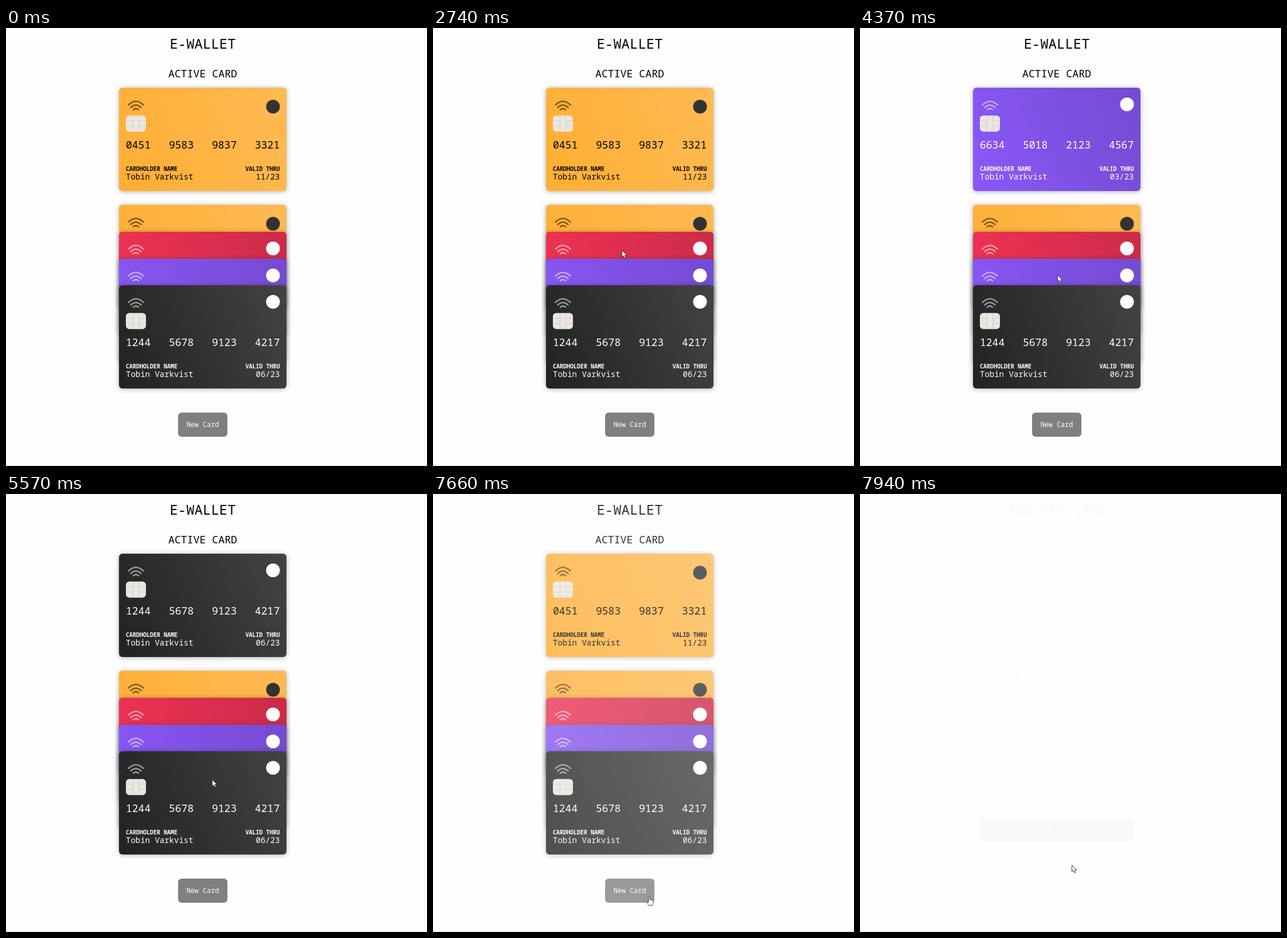
Animation of 734 by 763 pixels, one loop 7990 ms. Source, as an HTML page:

```html
<!DOCTYPE html>
<html lang="en">
<head>
<meta charset="utf-8">
<title>E-Wallet</title>
<style>
  html, body { margin: 0; width: 100%; height: 100%; overflow: hidden; background: #fefefe; }
  body { position: relative; }
  svg, .page, .card { position: absolute; left: 0; top: 0; }
  svg { width: 734px; height: 763px; overflow: visible; }
  .card svg { width: 292px; height: 180px; }
  .card { left: 197px; width: 292px; height: 180px; border-radius: 6px; box-shadow: 0 1px 8px rgba(25, 35, 45, .36); }
  text { font-family: "Noto Sans Mono", "DejaVu Sans Mono", monospace; font-weight: 500; white-space: pre; }
  #rule { position: absolute; left: 0; right: 0; top: 762px; height: 1px; background: #ddd; }
</style>
</head>
<body>
<div class="page" id="wallet"></div>
<div class="page" id="form"></div>
<div id="rule"></div>
<svg id="cursor">
  <g stroke="#2b2b2b" stroke-width=".9" fill="#fff" stroke-linejoin="round">
    <path id="arrow" d="M.5.5V12L3.1 9.6 5 14 7 13.1 5.2 8.9H8.8Z"/>
    <path id="hand" d="M-1.2.4Q0-1.4 1.2.4V5Q2.5 4.2 3.4 5.4 4.6 4.8 5.3 6 6.9 5.6 7 7.4V10.6L5.4 14.6H-.8L-4.6 9.4Q-4.8 7.6-3 8.2L-1.2 9.8Z"/>
  </g>
</svg>
<script>
const LOOP = 7990;
const $ = id => document.getElementById(id);
const light = "rgba(255,255,255,.15)", dark = "rgba(0,0,0,.16)";

const cards = [
  { base: "#ffae34", tint: light, ink: "#000", mark: "#333", markY: 33, number: "0451 9583 9837 3321", valid: "11/23" },
  { base: "#f33355", tint: dark, number: "7812 2222 3412 9456", valid: "05/23" },
  { base: "#8b58f9", tint: dark, number: "6634 5018 2123 4567", valid: "03/23" },
  { base: "#222", tint: light, number: "1244 5678 9123 4217", valid: "06/23" }
];

// [time, index of the active card]
const picks = [[0, 0], [3020, 1], [4290, 2], [5440, 3], [6410, 0]];

// [start, end, control x, control y, end x, end y]
const moves = [
  [190, 450, 560, 640, 458, 577],
  [650, 1440, 239, 400, 340, 260],
  [1470, 1750, 339, 220, 365, 207],
  [1750, 2230, 435, 210, 350, 270],
  [2280, 2740, 345, 330, 329, 387],
  [3400, 3630, 334, 412, 344, 430],
  [4520, 4930, 378, 462, 359, 497],
  [5720, 6180, 352, 415, 345, 332],
  [6540, 7200, 350, 520, 383, 689],
  [7250, 7380, 382, 698, 377, 702],
  [7680, 7935, 376, 670, 369, 646]
];

const text = (x, y, size, str, fill = "#000", anchor = "start", weight = 500) =>
  `<text x="${x}" y="${y}" font-size="${size}" fill="${fill}" text-anchor="${anchor}" style="font-weight:${weight}">${str}</text>`;

const rect = (x, y, w, h, attrs) => `<rect x="${x}" y="${y}" width="${w}" height="${h}" ${attrs}/>`;

function card({ base, tint, ink = "#fff", mark = "#fff", markY = 29, number, valid }, y) {
  const digits = number.split(" ").map((s, i) => text(12 + i * 75, 105.5, 18, s, ink)).join("");
  return `<div class="card" style="top:${y}px;background:linear-gradient(248.5deg,${tint},transparent),${base}"><svg>
    <path d="M16.5 30Q29.5 17.5 42.5 30M20.5 34.5Q29.5 26 38.5 34.5M25 38.2Q29.5 34.6 34 38.2"
      fill="none" stroke="${ink}" stroke-opacity=".52" stroke-width="2.5" stroke-linecap="round"/>
    ${rect(12, 48.5, 35, 28, 'rx="6" fill="#eae7e0"')}
    <path d="M24.5 48.5V76.5M35 48.5V76.5M12 57.5H24.5M12 67H24.5M35 57.5H47M35 67H47" stroke="#d0cdc6" fill="none"/>
    <circle cx="268.5" cy="${markY}" r="12" fill="${mark}"/>
    ${digits}
    ${text(12, 145, 10, "CARDHOLDER NAME", ink, "start", 600)}
    ${text(12, 160, 14, "Tobin Varkvist", ink)}
    ${text(280.5, 145, 10, "VALID THRU", ink, "end", 600)}
    ${text(280.5, 160, 14, valid, ink, "end")}
  </svg></div>`;
}

$("wallet").innerHTML = `<svg>
    ${text(343, 35.5, 24, "E-WALLET", "#000", "middle")}
    ${text(343, 86, 18.2, "ACTIVE CARD", "#000", "middle")}
    ${rect(300, 670, 86, 42, 'rx="6" fill="#808080"')}
    ${text(343, 695, 11.8, "New Card", "#fff", "middle", 400)}
  </svg>`
  + cards.map(c => card(c, 104)).join("")
  + cards.map((c, i) => card(c, 308 + i * 46.75)).join("");
const active = [...document.querySelectorAll(".card")].slice(0, cards.length);

const label = (x, y, str) => text(x, y, 11.7, str);
const field = (x, y, w) => rect(x, y, w, 26, 'rx="4" fill="#fff" stroke="#000"');
$("form").innerHTML = `<svg>
    <path d="M214 18L206 26.5 214 35" fill="none" stroke="#000" stroke-width="2"/>
    ${text(343.5, 35.5, 24, "ADD NEW CARD", "#000", "middle", 700)}
    ${label(209, 258, "CARD NUMBER")}${field(210, 273.5, 267)}
    ${label(209, 321, "CARDHOLDER NAME")}${field(210, 336.5, 267)}
    ${label(209, 383, "MONTH")}${field(210, 397.5, 127)}
    ${label(350, 383, "YEAR")}${field(350, 397.5, 127)}
    ${label(209, 446, "CCV")}${field(210, 460, 267)}
    ${label(209, 509, "VENDOR")}${field(210, 523, 267)}
    ${rect(209, 564, 269, 41, 'rx="4"')}
    ${text(343, 588, 12, "ADD CARD", "#fff", "middle")}
  </svg>`;

const progress = (t, a, b) => Math.min(1, Math.max(0, (t - a) / (b - a)));
const easeInOut = p => p < .5 ? 2 * p * p : 1 - 2 * (1 - p) ** 2;
const bezier = (a, c, b, p) => a * (1 - p) ** 2 + 2 * c * p * (1 - p) + b * p * p;

function pointer(t) {
  let x = 672, y = 772;
  for (const [start, end, cx, cy, ex, ey] of moves) {
    if (t < start) break;
    const p = progress(t, start, end), s = p * p * (3 - 2 * p);
    x = bezier(x, cx, ex, s);
    y = bezier(y, cy, ey, s);
  }
  return [x, y];
}

function draw(now) {
  const t = now % LOOP;
  const pick = picks.filter(p => p[0] <= t).pop()[1];
  active.forEach((el, i) => el.style.display = i === pick ? "" : "none");

  $("wallet").style.opacity = 1 - easeInOut(progress(t, 7535, 7925));
  $("form").style.opacity = t < 7930 ? 0 : .015;

  const [x, y] = pointer(t);
  const onButton = x > 300 && x < 386 && y > 670 && y < 712;
  $("cursor").style.transform = `translate(${x}px,${y}px)`;
  $("arrow").style.display = onButton ? "none" : "";
  $("hand").style.display = onButton ? "" : "none";
  requestAnimationFrame(draw);
}
requestAnimationFrame(draw);
</script>
</body>
</html>
```
